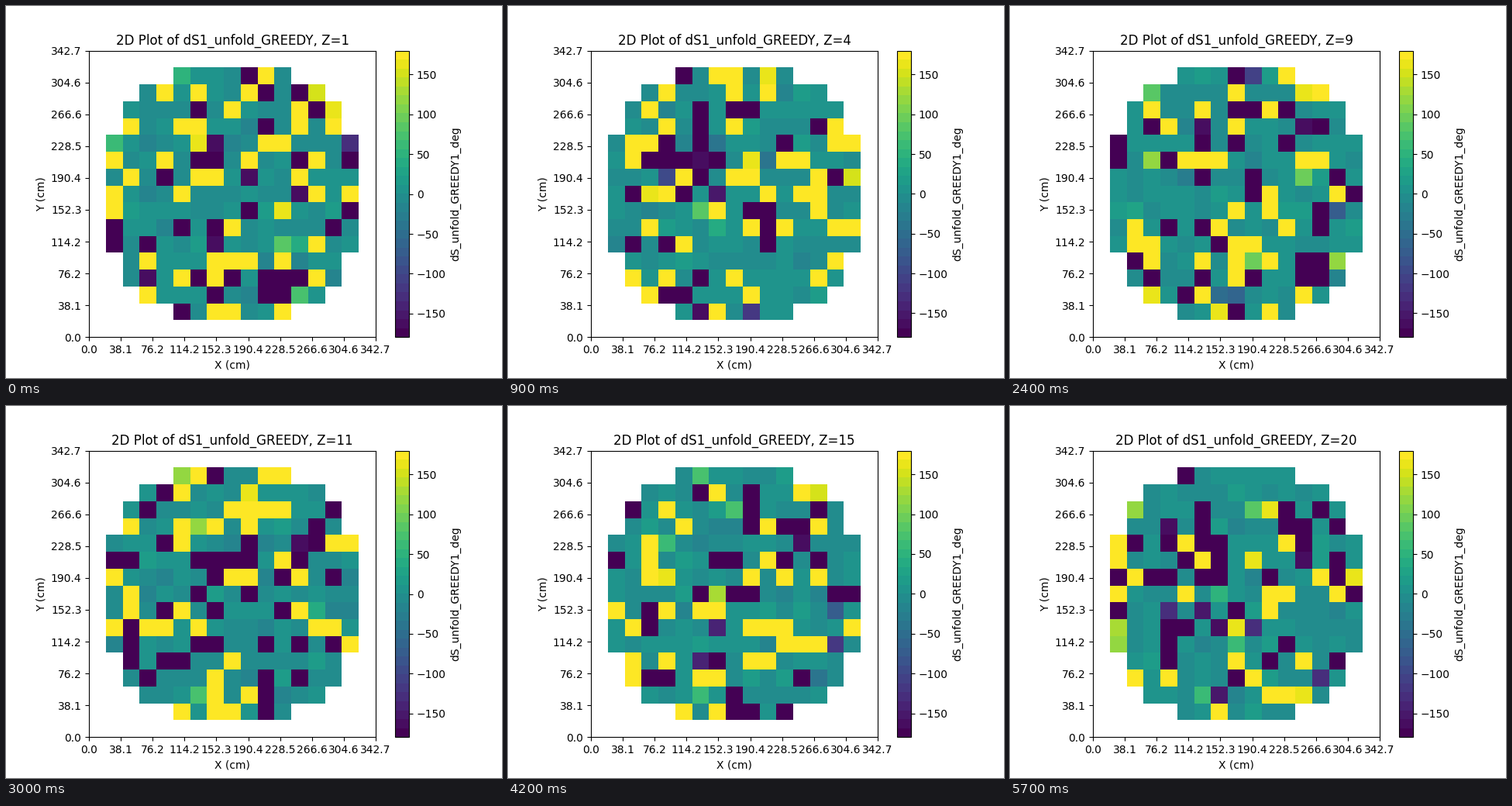
Write a matplotlib script that moves like this. It is 640x480 px and loops after 6 s.

```python
import numpy as np
import matplotlib.pyplot as plt
from matplotlib.animation import FuncAnimation

CELLS = 17
SIZE = 342.72      # cm
LAYERS = 20
LIMIT = 180        # degrees

rows, cols = np.indices((CELLS, CELLS)) - CELLS // 2
outside = rows**2 + cols**2 >= 64


def layer(z):
    """Phase map: mostly near zero, with wraps to both ends of the range."""
    rng = np.random.default_rng(100 + z)
    shape = (CELLS, CELLS)
    pick = rng.random(shape)
    spread = np.abs(rng.normal(0, 6, shape))
    stray = rng.uniform(-165, 165, shape)
    grid = np.select(
        [pick < 0.16, pick < 0.22, pick > 0.79],
        [spread - LIMIT, stray, LIMIT - spread],
        rng.normal(0, 7, shape))
    return np.ma.array(grid, mask=outside)


fig, ax = plt.subplots(figsize=(6.4, 4.8), dpi=100)
edges = np.linspace(0, SIZE, CELLS + 1)
mesh = ax.pcolormesh(edges, edges, layer(1),
                     cmap=plt.get_cmap("viridis", 32),
                     vmin=-LIMIT, vmax=LIMIT)
ax.set_aspect("equal")
fig.colorbar(mesh, label="dS_unfold_GREEDY1_deg")

ticks = np.linspace(0, SIZE, 10)
labels = [f"{t:.1f}" for t in ticks]
ax.set_xticks(ticks, labels)
ax.set_yticks(ticks, labels)
ax.set_xlabel("X (cm)")
ax.set_ylabel("Y (cm)")
title = ax.set_title("")


def draw(i):
    grid = layer(i + 1)
    mesh.set_array(grid)
    mesh.set_clim(grid.min(), grid.max())
    title.set_text(f"2D Plot of dS1_unfold_GREEDY, Z={i + 1}")
    return mesh, title


anim = FuncAnimation(fig, draw, frames=LAYERS, interval=300,
                     init_func=lambda: draw(0), repeat=True, repeat_delay=0)
plt.show()
```
